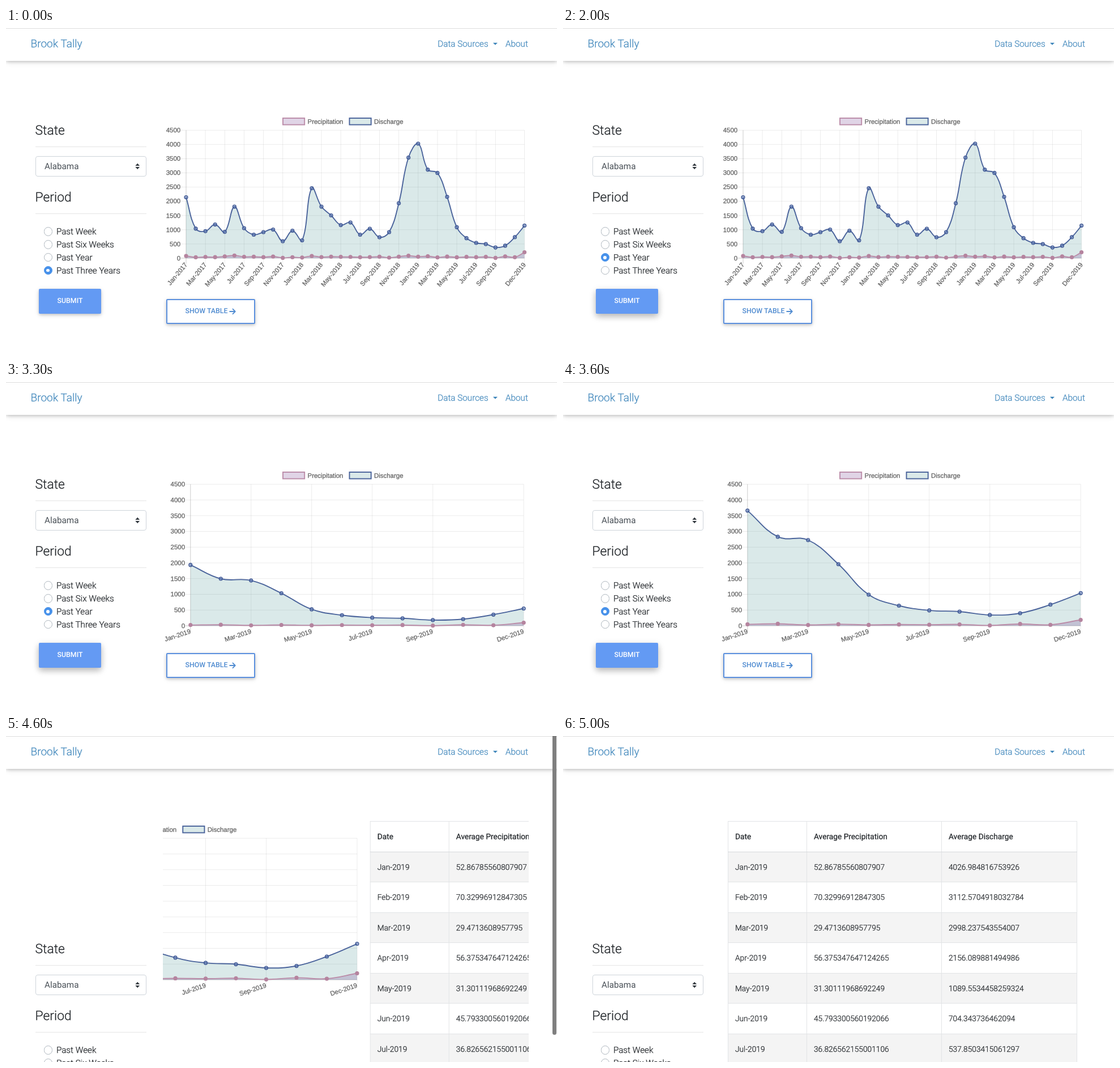
These frames come from a looping animation (973x575 px, 5100 ms). An HTML page:

```html
<!DOCTYPE html>
<html lang="en">
<head>
<meta charset="utf-8">
<title>Brook Tally</title>
<style>
  :root { --loop: 5100ms; --link: #4288bc; --blue: #4791ea; --ink: #212529; }
  html, body { margin: 0; width: 100%; height: 100%; overflow: hidden; background: #fff; }
  #stage {
    position: relative; width: 973px; height: 575px; overflow: hidden;
    font: 300 15.25px Roboto, sans-serif; color: var(--ink);
    -webkit-text-stroke: .25px; text-rendering: geometricPrecision;
  }
  #stage div, #stage span, #stage i, #stage svg.fill { position: absolute; box-sizing: border-box; }
  #stage span { white-space: nowrap; line-height: 24px; }
  .full, .fill { left: 0; top: 0; width: 973px; height: 575px; }

  nav {
    position: absolute; inset: 0 0 auto; height: 57.5px; background: #fff; color: var(--link);
    box-shadow: 0 2px 5px rgba(0,0,0,.16), 0 2px 10px rgba(0,0,0,.12);
    border-top: 1px solid #dcdcdc; box-sizing: border-box;
  }
  nav span { top: 15px; }
  nav .brand { left: 43.5px; font-size: 19.07px; }
  .caret { left: 859.5px; top: 24.5px; border: 4.3px solid transparent; border-top-color: var(--link); border-bottom: 0; }

  #panel { animation: drop var(--loop) infinite step-end; }
  .head { left: 51.5px; font-size: 22.9px; }
  .rule { left: 52px; width: 196px; height: 1px; background: rgba(0,0,0,.1); }
  .select { left: 52px; top: 225.5px; width: 196px; height: 36.5px; border: 1px solid #ced4da; border-radius: 4px; }
  .select span { left: 15px; top: 5.5px; font-weight: 400; color: #495057; -webkit-text-stroke: 0; }
  .radio { left: 66.7px; height: 24px; }
  .radio span { left: 22.2px; top: 0; }
  .radio i { top: 4.3px; width: 15.4px; height: 15.4px; border: 1px solid #adb5bd; border-radius: 50%; background: #fff; }
  .radio b { position: absolute; left: 3.8px; top: 3.8px; width: 5.8px; height: 5.8px; border-radius: 50%; background: #fff; }
  .year i { animation: turnOn var(--loop) infinite; }
  .three i { animation: turnOff var(--loop) infinite; }
  .three b { animation: dotOff var(--loop) infinite step-end; }

  .btn {
    display: flex; align-items: center; justify-content: center; gap: 3px; border-radius: 2px;
    font-size: 12.36px; font-weight: 500; -webkit-text-stroke: 0;
    --rest: 0 2px 5px rgba(0,0,0,.16), 0 2px 9.5px rgba(0,0,0,.12);
    --lift: 0 5px 10.5px rgba(0,0,0,.18), 0 4px 14.3px rgba(0,0,0,.15);
    box-shadow: var(--rest);
  }
  #stage .btn span { position: relative; }
  .submit {
    left: 58px; top: 460px; width: 110px; height: 44px; background: #639af3; color: #fff;
    animation: hoverSubmit var(--loop) infinite;
  }
  .clip { inset: 0; overflow: hidden; border-radius: 2px; }
  .ripple {
    left: -10px; top: -43px; width: 130px; height: 130px; border-radius: 50%; background: #fff;
    animation: ripple var(--loop) infinite;
  }
  .show {
    left: 283px; top: 478px; width: 157px; height: 44px; background: #fff; border: 2px solid #5b90de; color: #4f8bd0;
    animation: hoverShow var(--loop) infinite;
  }

  #view { clip-path: inset(0 50px 0 277px); }
  #track { animation: slide var(--loop) infinite; }
  #table { left: 646px; }
  table { position: absolute; left: 291px; top: 149.5px; width: 617px; table-layout: fixed; border-collapse: collapse; font-size: 13.73px; }
  th, td { box-sizing: border-box; height: 53.5px; padding: 2px 0 0 12px; border: 1px solid #e2e4e6; text-align: left; font-weight: 300; line-height: 20px; }
  th { height: 54px; padding-top: 1px; font-weight: 400; border-bottom-color: #d6d9dc; }
  tbody tr:nth-child(odd) { background: #f4f4f4; }

  .labels text { font: 11.45px "Liberation Sans", Arial, sans-serif; fill: #606060; stroke: #606060; stroke-width: .25px; }
  .scroll { left: 965px; top: 0; width: 6.5px; height: 527px; border-radius: 0 0 4px 4px; background: #7f7f7f; animation: scroll var(--loop) infinite; }

  @keyframes drop { 84.65% { transform: translateY(195px) } 100% { transform: translateY(195px) } }
  @keyframes turnOn {
    0%, 23.5% { background: #fff; border-color: #adb5bd }
    25.5% { background: #b5d7fb; border-color: #a9cbef }
    27.4%, 100% { background: var(--blue); border-color: var(--blue) }
  }
  @keyframes turnOff {
    0%, 23.5% { background: var(--blue); border-color: var(--blue) }
    25.5% { background: #d3e5fb; border-color: #9bb8dc }
    27.4%, 100% { background: #fff; border-color: #adb5bd }
  }
  @keyframes dotOff { 24.5%, 100% { opacity: 0 } }
  @keyframes hoverSubmit {
    0%, 35.3%, 76.5%, 100% { box-shadow: var(--rest) }
    39.2%, 72.5% { box-shadow: var(--lift) }
  }
  @keyframes hoverShow {
    0%, 79.4% { box-shadow: var(--rest) }
    83.3%, 100% { box-shadow: var(--lift) }
  }
  @keyframes ripple {
    0%, 50% { transform: scale(0); opacity: .2; animation-timing-function: ease-out }
    54.5%, 59.8% { transform: none; opacity: .2 }
    66.7%, 100% { transform: none; opacity: 0 }
  }
  @keyframes slide {
    0%, 84.64% { transform: none; animation-timing-function: ease-in-out }
    96.4%, 100% { transform: translateX(-646px) }
  }
  @keyframes scroll {
    0%, 84.6% { opacity: 0 }
    84.7%, 93% { opacity: 1 }
    97%, 100% { opacity: 0 }
  }
</style>
</head>
<body>
<div id="stage">
  <div id="panel" class="full">
    <span class="head" style="top:169px">State</span>
    <div class="rule" style="top:209px"></div>
    <div class="select"><span>Alabama</span></div>
    <svg class="fill"><path d="M228.3 243L232.2 238.8 236.1 243ZM228.3 245L232.2 249.2 236.1 245Z" fill="#343a40"/></svg>
    <span class="head" style="top:287px">Period</span>
    <div class="rule" style="top:327px"></div>
    <div class="radio" style="top:347px"><i></i><span>Past Week</span></div>
    <div class="radio" style="top:369.9px"><i></i><span>Past Six Weeks</span></div>
    <div class="radio year" style="top:392.8px"><i><b></b></i><span>Past Year</span></div>
    <div class="radio three" style="top:415.6px"><i><b></b></i><span>Past Three Years</span></div>
    <div class="btn submit"><div class="clip"><div class="ripple"></div></div><span>SUBMIT</span></div>
  </div>

  <div id="view" class="full">
    <div id="track" class="full">
      <svg id="chart" class="fill"></svg>
      <div class="btn show">
        <span>SHOW TABLE</span>
        <svg width="12" height="12" fill="none" stroke="currentColor" stroke-width="1.8"><path d="M.5 6H11M6 1.2L10.8 6 6 10.8"/></svg>
      </div>
      <div id="table" class="full">
        <table>
          <colgroup><col style="width:139px"><col style="width:238px"><col style="width:239px"></colgroup>
          <thead><tr><th>Date</th><th>Average Precipitation</th><th>Average Discharge</th></tr></thead>
          <tbody></tbody>
        </table>
      </div>
    </div>
  </div>

  <nav>
    <span class="brand">Brook Tally</span>
    <span style="left:762.3px">Data Sources</span>
    <div class="caret"></div>
    <span style="left:882px">About</span>
  </nav>
  <div class="scroll"></div>
</div>

<script>
const LOOP = 5100, REDRAW = 3150, GROW = 1000, TOP = 180.3, MAX = 4500;
const MONTHS = 'Jan Feb Mar Apr May Jun Jul Aug Sep Oct Nov Dec'.split(' ');

const discharge = [
  2142, 1040, 950, 1185, 925, 1813, 1056, 827, 917, 1006, 598, 967,
  628, 2461, 1813, 1505, 1165, 1255, 827, 1036, 737, 917, 1933, 3538,
  4027, 3113, 2998, 2156, 1090, 704, 538, 495, 378, 441, 739, 1144];
const rain = [
  80, 32, 45, 36, 65, 95, 50, 55, 36, 60, 12, 35,
  24, 78, 40, 55, 48, 45, 35, 38, 55, 20, 55, 88,
  53, 70, 29, 56, 31, 46, 37, 48, 12, 65, 35, 207];

const series = [
  { data: discharge, name: 'Discharge', x: 606, line: '#4a639b', fill: 'rgba(70,145,145,.2)', dot: 'rgba(85,115,180,.5)', ring: '#425a95' },
  { data: rain, name: 'Precipitation', x: 488.5, line: '#bb8ca8', fill: 'rgba(100,40,130,.2)', dot: '#b5849f', ring: '#b5849f' }
];

const svg = document.getElementById('chart');

function add(parent, tag, attrs, text) {
  const node = document.createElementNS('http://www.w3.org/2000/svg', tag);
  for (const key in attrs) node.setAttribute(key, attrs[key]);
  if (text !== undefined) node.textContent = text;
  return parent.appendChild(node);
}

// Smooth curve with tension .4, handles kept inside the plot
function curve(pts, base) {
  const cap = y => Math.max(TOP, Math.min(base, y));
  const handles = pts.map((p, i) => {
    const a = pts[i - 1] || p, b = pts[i + 1] || p;
    const before = Math.hypot(p[0] - a[0], p[1] - a[1]);
    const after = Math.hypot(b[0] - p[0], b[1] - p[1]);
    const k = .4 / (before + after), dx = b[0] - a[0], dy = b[1] - a[1];
    return {
      into: [p[0] - k * before * dx, cap(p[1] - k * before * dy)],
      out: [p[0] + k * after * dx, cap(p[1] + k * after * dy)]
    };
  });
  return pts.reduce((d, p, i) => d + (i ? `C${handles[i - 1].out} ${handles[i].into} ${p}` : `M${p}`), '');
}

function makeChart({ left, right, base, first, angle }) {
  const group = add(svg, 'g', { class: 'labels' });
  const count = 36 - first;
  const px = i => left + (right - left) * i / (count - 1);
  const py = v => base - (base - TOP) * v / MAX;
  const rule = (x1, y1, x2, y2, strong) =>
    add(group, 'line', { x1, y1, x2, y2, stroke: '#000', 'stroke-opacity': strong ? .22 : .085, 'stroke-width': .95 });

  for (let v = 0; v <= MAX; v += 500) {
    rule(left - 9.5, py(v), right, py(v), v === 0);
    add(group, 'text', { x: left - 9.8, y: py(v) + 3.8, 'text-anchor': 'end' }, v);
  }
  for (let i = 0; i < count; i++) {
    if (i !== count - 1 && (i % 2 || i === count - 2)) continue;
    const m = first + i, x = px(i);
    rule(x, TOP, x, base + 9.5, i === 0);
    add(group, 'text', {
      transform: `translate(${x} ${base + 9.5}) rotate(${angle})`, y: 3.8, 'text-anchor': 'end'
    }, `${MONTHS[m % 12]}-${2017 + Math.floor(m / 12)}`);
  }

  const layers = series.map(s => ({
    data: s.data.slice(first),
    area: add(group, 'path', { fill: s.fill }),
    line: add(group, 'path', { fill: 'none', stroke: s.line, 'stroke-width': 1.9 }),
    dots: s.data.slice(first).map((_, i) =>
      add(group, 'circle', { cx: px(i), r: 2.9, fill: s.dot, stroke: s.ring, 'stroke-width': 1.4 }))
  }));

  const draw = grow => layers.forEach(({ data, area, line, dots }) => {
    const pts = data.map((v, i) => [px(i), py(v * grow)]);
    const d = curve(pts, base);
    line.setAttribute('d', d);
    area.setAttribute('d', `${d}L${right} ${base}L${left} ${base}Z`);
    dots.forEach((dot, i) => dot.setAttribute('cy', pts[i][1]));
  });
  draw(1);
  return { group, draw };
}

const legend = add(svg, 'g', { class: 'labels' });
series.forEach(s => {
  add(legend, 'rect', { x: s.x + .5, y: 159, width: 38.2, height: 11.6, fill: s.fill, stroke: s.line, 'stroke-width': 1.9 });
  add(legend, 'text', { x: s.x + 44, y: 168.6 }, s.name);
});

const threeYears = makeChart({ left: 318, right: 915.6, base: 406, first: 0, angle: -50 });
const oneYear = makeChart({ left: 325.8, right: 914.2, base: 430, first: 24, angle: -18 });

const rows = [
  ['52.86785560807907', '4026.984816753926'],
  ['70.32996912847305', '3112.5704918032784'],
  ['29.4713608957795', '2998.237543554007'],
  ['56.375347647124265', '2156.089881494986'],
  ['31.30111968692249', '1089.5534458259324'],
  ['45.793300560192066', '704.343736462094'],
  ['36.826562155001106', '537.8503415061297']
];
document.querySelector('tbody').innerHTML = rows.map((r, i) =>
  `<tr><td>${MONTHS[i]}-2019</td><td>${r[0]}</td><td>${r[1]}</td></tr>`).join('');

// One clock for the styles and the chart
const start = document.timeline.currentTime || 0;
document.getAnimations().forEach(a => { a.startTime = start; });

function frame(now) {
  const t = Math.max(0, now - start) % LOOP;
  const redrawn = t >= REDRAW;
  threeYears.group.style.display = redrawn ? 'none' : '';
  oneYear.group.style.display = redrawn ? '' : 'none';
  if (redrawn) oneYear.draw(1 - (1 - Math.min(1, (t - REDRAW) / GROW)) ** 4);
  requestAnimationFrame(frame);
}
frame(start);
</script>
</body>
</html>
```
